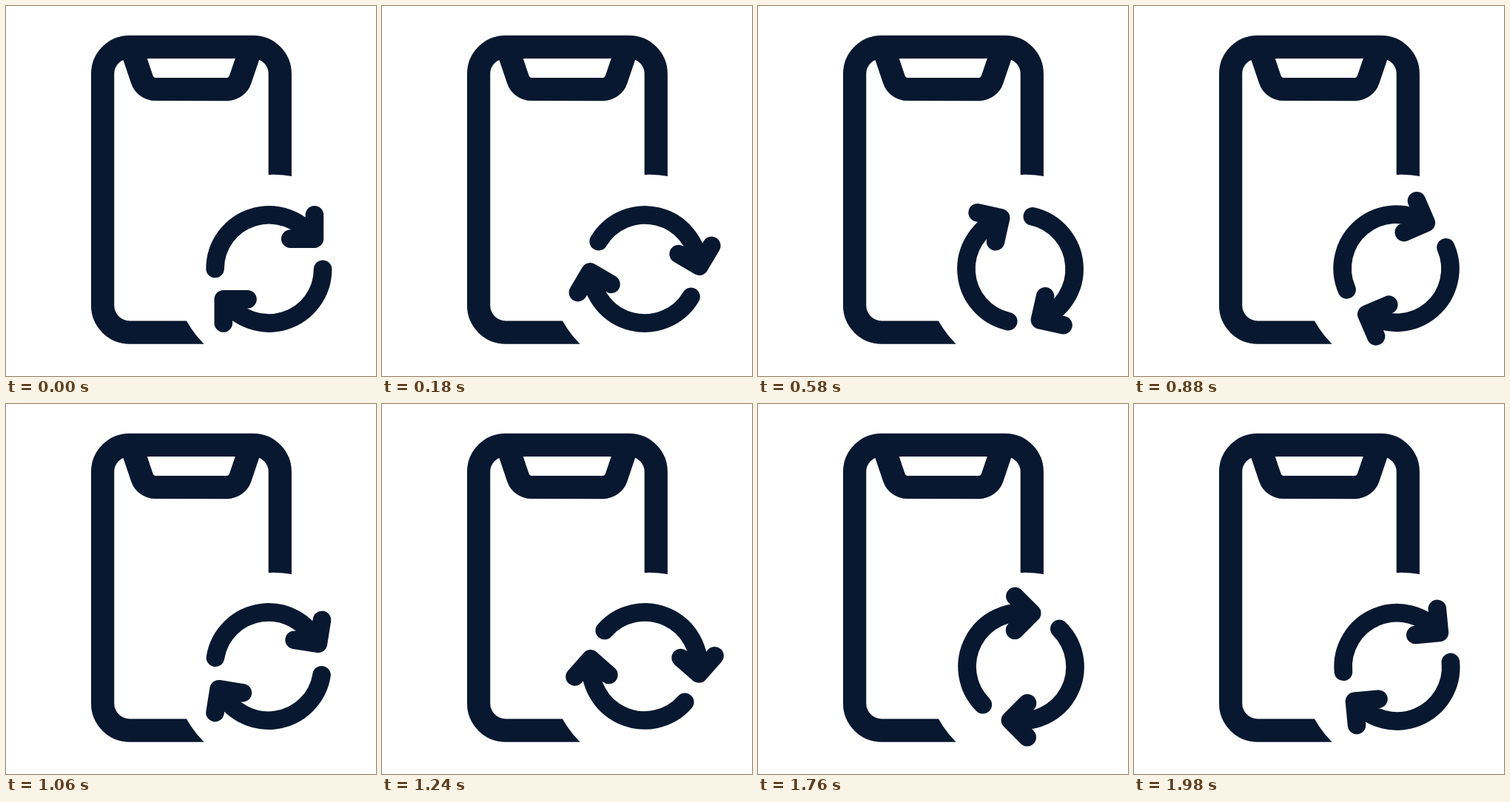
Write an HTML page that moves like this. It is 500 by 500 pixels and loops after 2 s.

```html
<!DOCTYPE html>
<html lang="en">
<head>
<meta charset="utf-8">
<title>Phone sync</title>
<style>
  html, body { margin: 0; width: 100%; height: 100%; overflow: hidden; background: #fff; }
  svg { display: block; width: 100vw; height: 100vh; }
</style>
</head>
<body>
<svg viewBox="0 0 500 500" fill="none" stroke="#081830">
  <g stroke-width="31.25">
    <rect x="130.6" y="55.4" width="239.7" height="385.6" rx="36.4"/>
    <path d="M169 55.4 183.9 99.5A19 19 0 0 0 201.9 112.5H298.6A19 19 0 0 0 316.6 99.5L331.5 55.4"/>
  </g>
  <circle cx="361.5" cy="361.5" r="133.8" fill="#fff" stroke="none"/>
  <g id="arrows" stroke-width="24.6" stroke-linecap="round" stroke-linejoin="round">
    <path id="arrow" d="M282.6 355A72.8 72.8 0 0 1 415.9 314.6M416.9 282.3V314.6H384.2"/>
    <use href="#arrow" transform="rotate(180 355.35 355.4)"/>
  </g>
</svg>
<script>
  const LOOP = 2000, STEP = 20;
  const arrows = document.getElementById('arrows');

  function draw() {
    // Small bias keeps clock rounding from landing one step early.
    const step = Math.floor(performance.now() % LOOP / STEP + 0.1);
    const angle = Math.max(0, (step - 0.5) * STEP / LOOP * 360);
    arrows.setAttribute('transform', `rotate(${angle} 355 355)`);
    requestAnimationFrame(draw);
  }
  draw();
</script>
</body>
</html>
```
